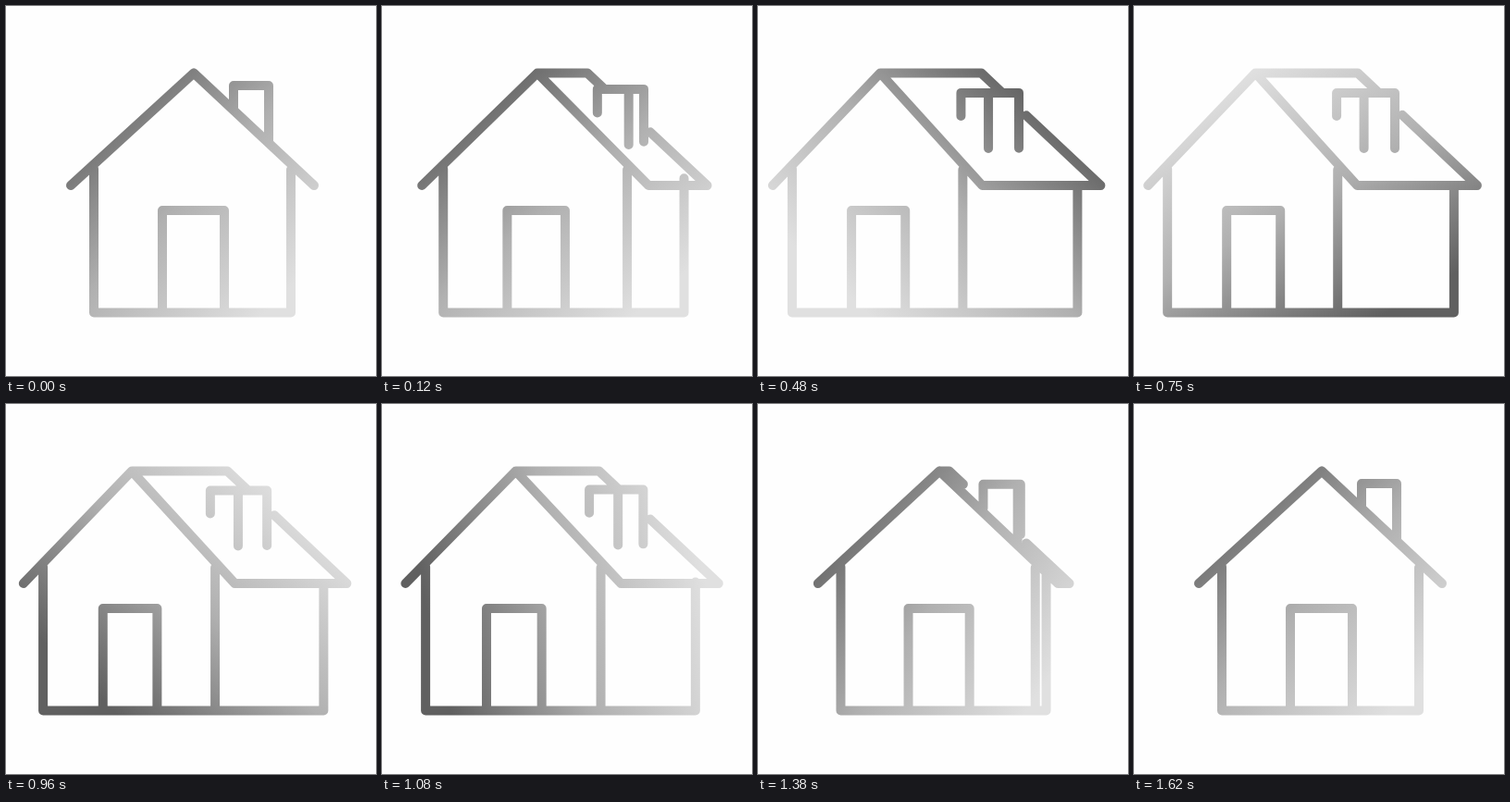
An HTML page with a canvas for the animation above (2650 ms loop, 400 by 400 pixels).

```html
<!DOCTYPE html>
<html lang="en">
<head>
<meta charset="utf-8">
<title>House</title>
<style>
html, body { margin: 0; width: 100%; height: 100%; overflow: hidden; background: #fefefe; }
canvas { display: block; width: 100vmin; height: 100vmin; }
</style>
</head>
<body>
<canvas id="stage"></canvas>
<script>
const SIZE = 400, LOOP = 2650, MOVE = 1620, TURN = 690, STEP = 30;
const canvas = document.getElementById('stage');
const ctx = canvas.getContext('2d');
const ratio = window.devicePixelRatio || 1;
canvas.width = canvas.height = SIZE * ratio;
ctx.scale(ratio, ratio);

// Eased curve through (0,0), (x1,0), (x2,1), (1,1)
function ease(x, x1, x2) {
  let lo = 0, hi = 1, s = 0.5;
  for (let i = 0; i < 24; i++) {
    s = (lo + hi) / 2;
    const r = 1 - s;
    if (3 * r * r * s * x1 + 3 * r * s * s * x2 + s * s * s < x) lo = s;
    else hi = s;
  }
  return s * s * (3 - 2 * s);
}

// How far the side of the house is turned into view
function depthAt(t) {
  if (t >= MOVE) return 0;
  if (t < TURN) return 1 - Math.pow(1 - t / TURN, 3.5);
  return 1 - ease((t - TURN) / (MOVE - TURN), 0.77, 0.38);
}

function shade(t) {
  const turn = ease(Math.min(t / MOVE, 1), 0.37, 0.47);
  const a = Math.PI * (0.25 + 2 * turn);
  const dx = Math.cos(a) * 150, dy = Math.sin(a) * 150;
  const g = ctx.createLinearGradient(198 - dx, 202 - dy, 198 + dx, 202 + dy);
  g.addColorStop(0, '#606060');
  g.addColorStop(0.5, '#b0b0b0');
  g.addColorStop(1, '#e0e0e0');
  return g;
}

function line(...pts) {
  ctx.moveTo(pts[0], pts[1]);
  for (let i = 2; i < pts.length; i += 2) ctx.lineTo(pts[i], pts[i + 1]);
}

function draw(t) {
  const p = depthAt(t);
  const mix = (a, b) => a + (b - a) * p;
  const ridge = 72.5, eave = 194, base = 331.5;
  const peak = mix(203, 131), backPeak = mix(203, 242);
  const tip = mix(333, 241), backTip = mix(333, 371);
  const left = mix(95, 36), right = mix(308, 220), back = mix(308, 346);
  const doorL = mix(169, 100), doorR = mix(236, 158);
  const top = mix(86, 94), stackL = mix(246, 219), stackR = mix(284, 282);
  const stackM = mix(284, 248.5);
  const slope = (eave - ridge) / (backTip - backPeak);

  ctx.fillStyle = '#fefefe';
  ctx.fillRect(0, 0, SIZE, SIZE);
  ctx.strokeStyle = shade(t);
  ctx.lineWidth = 10;
  ctx.lineCap = ctx.lineJoin = 'round';
  ctx.beginPath();

  // Walls and door
  line(left, 176, left, base, back, base, back, mix(177, 196));
  line(right, 177, right, base);
  line(doorL, base, doorL, 221, doorR, 221, doorR, base);

  // Roof
  line(mix(70, 15), eave, peak, ridge, tip, eave, backTip, eave);
  line(peak, ridge, backPeak, ridge, backPeak + (top - ridge) / slope, top);
  line(290, ridge + (290 - backPeak) * slope, backTip, eave);

  // Chimney
  line(stackL, mix(112, 119), stackL, top, stackR, top, stackR, mix(140, 154));
  line(stackM, top, stackM, mix(146, 154));
  ctx.stroke();
}

const start = performance.now();
function tick() {
  const t = (performance.now() - start) % LOOP;
  draw(Math.floor(t / STEP) * STEP);
  requestAnimationFrame(tick);
}
tick();
</script>
</body>
</html>
```
